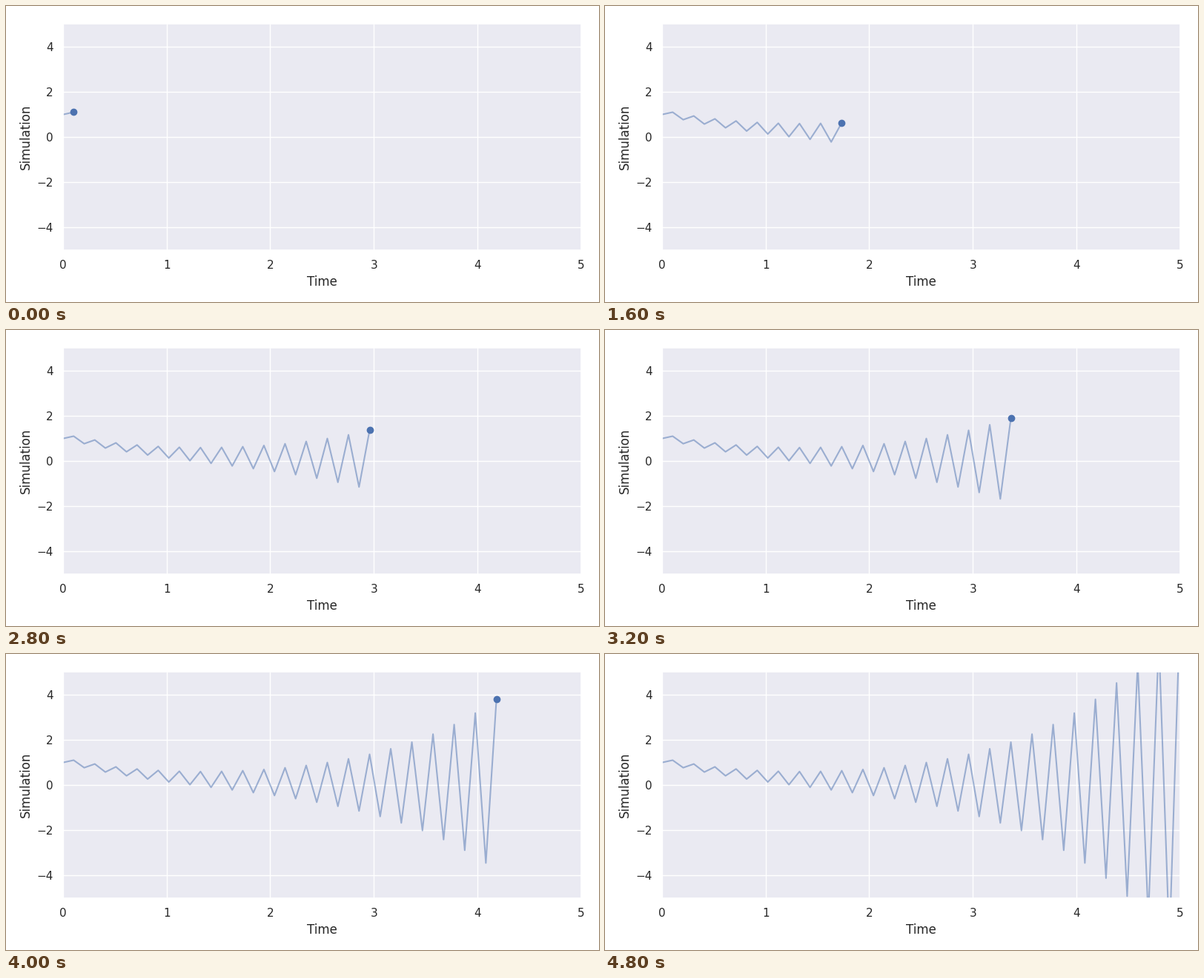
Recreate the animation shown at these times as a matplotlib script. Size 800x400 px, loop 4.9 s.

```python
import matplotlib.pyplot as plt
import numpy as np
from matplotlib.animation import FuncAnimation

W, H, DPI = 800, 400, 100
STEPS = 50
BLUE = "#4C72B0"

plt.rcParams.update({
    "font.family": "DejaVu Sans",
    "text.color": ".15",
    "axes.labelcolor": ".15",
    "axes.labelsize": 12,
    "axes.facecolor": "#EAEAF2",
    "axes.edgecolor": "white",
    "axes.linewidth": 1.25,
    "axes.grid": True,
    "axes.axisbelow": True,
    "grid.color": "white",
    "grid.linewidth": 1,
    "lines.solid_capstyle": "round",
})
for axis in ("xtick", "ytick"):
    plt.rcParams.update({
        f"{axis}.color": ".15",
        f"{axis}.labelsize": 11,
        f"{axis}.major.size": 6,
    })
plt.rcParams.update({"xtick.bottom": False, "ytick.left": False})

# Two-step scheme: a decaying solution plus a growing, alternating error
n = np.arange(STEPS)
t = np.linspace(0, 5, STEPS)
h = 0.102
y = (1 + h) * 0.9 ** n - h * (-1.0921) ** n

fig = plt.figure(figsize=(W / DPI, H / DPI), dpi=DPI, facecolor="white")
left, right, top, bottom = 77, 775.7, 24.4, 330
ax = fig.add_axes([left / W, 1 - bottom / H,
                   (right - left) / W, (bottom - top) / H])
ax.set(xlim=(0, 5), ylim=(-5, 5), xlabel="Time", ylabel="Simulation",
       xticks=range(6), yticks=range(-4, 5, 2))

trace, = ax.plot([], [], color=BLUE, alpha=0.5, lw=1.5)
head, = ax.plot([], [], "o", color=BLUE, ms=6)


def update(i):
    k = i + 1
    trace.set_data(t[:k + 1], y[:k + 1])
    head.set_data([t[k]], [y[k]])
    return trace, head


anim = FuncAnimation(fig, update, frames=STEPS - 1, interval=100,
                     repeat=True, repeat_delay=0)
plt.show()
```
